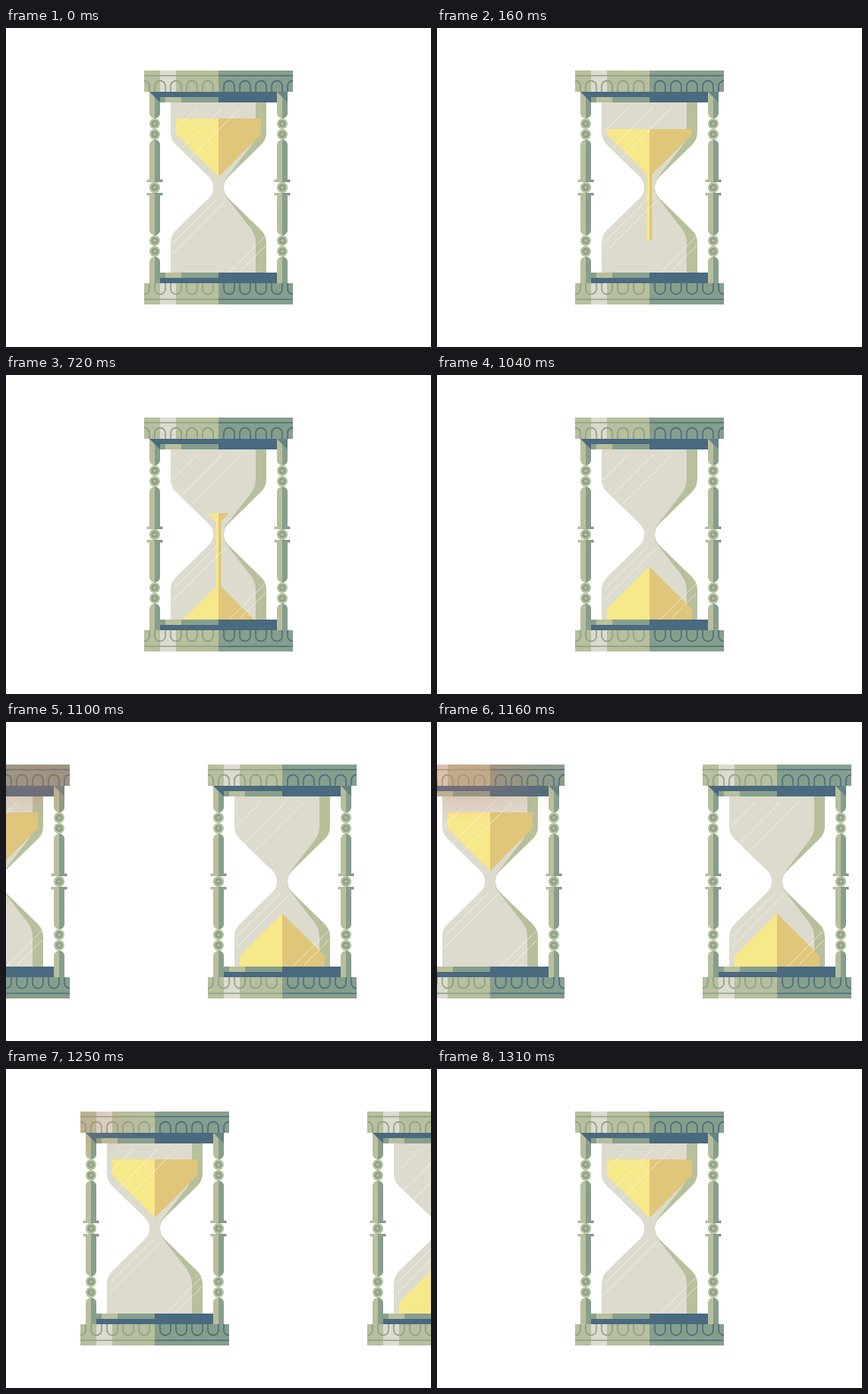
Animation, 480 px wide and 360 px high, one loop 1340 ms. Source, as an HTML page with a canvas:

```html
<!DOCTYPE html>
<html lang="en">
<head>
<meta charset="utf-8">
<title>Hourglass</title>
<style>
html, body { margin: 0; width: 100%; height: 100%; overflow: hidden; background: #fff; }
canvas { display: block; }
</style>
</head>
<body>
<canvas id="stage" width="480" height="360"></canvas>
<script>
const ctx = document.getElementById('stage').getContext('2d');
const OLIVE = '#b8bf9b', TEAL = '#869f8c', BLUE = '#4a6a80', PALE = '#dddbcd';
const SAND = '#f7e88a', SHADE = '#dfc67a';
const POUR_STEPS = 13, POUR_MS = 80, SLIDE_MS = 30, LOOP = 1340;
const SPACING = 324, SLIDE_PX = 36;

function rect(color, x, y, w, h) {
  ctx.fillStyle = color;
  ctx.fillRect(x, y, w, h);
}

function shape(color, path) {
  ctx.fillStyle = color;
  ctx.fill(new Path2D(path));
}

function disc(color, x, y, r) {
  ctx.fillStyle = color;
  ctx.beginPath();
  ctx.arc(x, y, r, 0, Math.PI * 2);
  ctx.fill();
}

// Draws the upper half, then the same thing reflected at the waist.
function mirrored(draw) {
  draw();
  ctx.save();
  ctx.translate(0, 360);
  ctx.scale(1, -1);
  draw();
  ctx.restore();
}

function beam() {
  rect(OLIVE, 156, 48, 84, 24);
  rect(PALE, 174, 48, 18, 24);
  rect(TEAL, 240, 48, 84, 24);
  rect(TEAL, 156, 53.2, 84, 1.2);
  rect(BLUE, 240, 53.2, 84, 1.2);
  ctx.save();
  ctx.beginPath();
  ctx.rect(156, 48, 168, 24);
  ctx.clip();
  ctx.lineWidth = 1.4;
  for (let i = 0; i < 5; i++) {
    for (const side of [-1, 1]) {
      const x = 240 + side * (12 + 18 * i);
      ctx.strokeStyle = side < 0 ? TEAL : BLUE;
      ctx.stroke(new Path2D(`M${x - 6} 72V65.5a6 6 0 0 1 12 0V72`));
    }
  }
  ctx.restore();
  rect(BLUE, 174, 72, 132, 12);
  rect(TEAL, 174, 78, 66, 6);
  rect(OLIVE, 180, 78, 18, 6);
}

function post(x) {
  const column = 'M-6 72H6V96a6 6 0 0 1-12 0Z' +
    'M-6 171V132a6 6 0 0 1 12 0V171L9 171V174H-9V171Z';
  ctx.save();
  ctx.translate(x, 0);
  shape(OLIVE, column);
  ctx.save();
  ctx.beginPath();
  ctx.rect(0, 72, 10, 102);
  ctx.clip();
  shape(TEAL, column);
  ctx.restore();
  for (const y of [108, 120, 180]) {
    disc(OLIVE, 0, y, 6);
    disc(TEAL, 0, y, 3.8);
    disc(OLIVE, 0, y, 1.8);
  }
  ctx.restore();
}

function glass() {
  shape(OLIVE, 'M240 84H294V118Q294 126 288 132L251 168Q246 173 246 180H240Z');
  shape(PALE, 'M186 84H282V118Q282 126 277 133L249 169Q246 173 246 180H234' +
    'Q234 173 229 168L192 132Q186 126 186 118Z');
}

// Sand is light to the left of the axis and dark to the right.
function sand(points) {
  for (const side of [-1, 1]) {
    ctx.fillStyle = side < 0 ? SAND : SHADE;
    ctx.beginPath();
    for (const [dx, y] of points) ctx.lineTo(240 + side * dx, y);
    ctx.fill();
  }
}

function sandAt(step) {
  const level = 102 + 6 * step;
  if (level < 168) {
    sand([[0, level], [Math.min(48, 168 - level), level], [Math.min(48, 168 - level), Math.max(120, level)], [0, 168]]);
  }
  const height = Math.max(0, Math.min(60, 6 * step - 14));
  const head = Math.min(276, 168 + 36 * step);
  const tail = 165 + 36 * Math.max(0, step - 11);
  if (step > 0 && tail < 276 - height) {
    sand([[0, tail], [3, tail], [3, head], [0, head]]);
  }
  if (height > 0) {
    const half = Math.min(48, height);
    sand([[0, 276 - height], [half, 276 - height + half], [half, 276], [0, 276]]);
  }
}

function reflections() {
  ctx.strokeStyle = 'rgba(255,255,255,.5)';
  ctx.lineWidth = 1;
  // Each streak: start point and its length down the diagonal.
  for (const [x, y, d] of [[216, 90, 28], [244, 90, 46], [265, 90, 56],
    [238, 193, 49], [248, 195, 60], [293, 235, 41], [293, 246, 28]]) {
    ctx.beginPath();
    ctx.moveTo(x, y);
    ctx.lineTo(x - d, y + d);
    ctx.stroke();
  }
}

function hourglass(offset, step) {
  ctx.save();
  ctx.translate(offset, 0);
  mirrored(glass);
  sandAt(step);
  reflections();
  mirrored(() => { beam(); post(168); post(312); });
  shape(BLUE, 'M162 72H174V84Z');
  shape('#648383', 'M306 72H318V84Z');
  ctx.restore();
}

// Warm light at the upper left, falling only on what is drawn there.
function warmGlow() {
  ctx.save();
  ctx.globalCompositeOperation = 'source-atop';
  ctx.translate(35, 60);
  ctx.scale(1, 0.42);
  const glow = ctx.createRadialGradient(0, 0, 20, 0, 0, 120);
  glow.addColorStop(0, 'rgba(212,125,100,.34)');
  glow.addColorStop(1, 'rgba(212,125,100,0)');
  rect(glow, -120, -120, 240, 240);
  ctx.restore();
}

function frame(now) {
  const t = now % LOOP;
  const slideStart = POUR_STEPS * POUR_MS;
  ctx.clearRect(0, 0, 480, 360);
  if (t < slideStart) {
    hourglass(0, Math.floor(t / POUR_MS));
  } else {
    const shift = SLIDE_PX * Math.floor((t - slideStart) / SLIDE_MS);
    hourglass(shift, POUR_STEPS);
    hourglass(shift - SPACING, 0);
    if (shift < SPACING) warmGlow();
  }
  requestAnimationFrame(frame);
}
requestAnimationFrame(frame);
</script>
</body>
</html>
```
